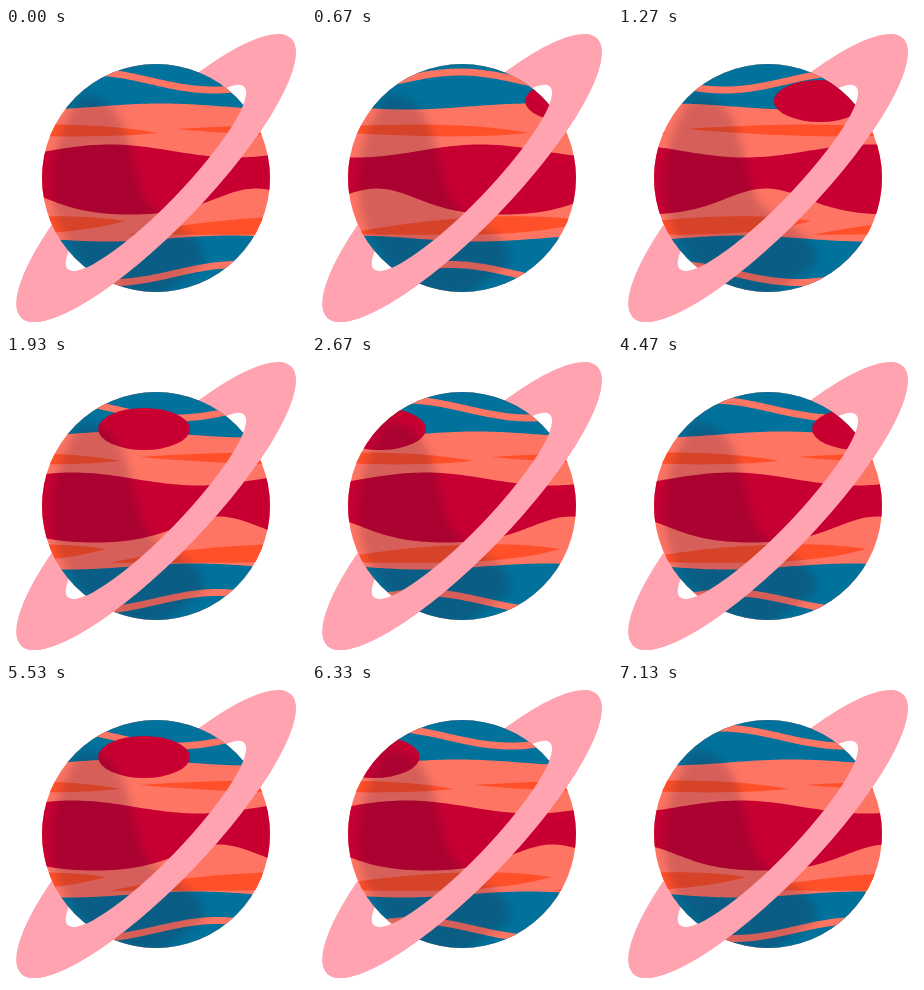
An HTML page with a canvas for the animation above (7190 ms loop, 300x300 px).

```html
<!DOCTYPE html>
<html lang="en">
<head>
<meta charset="utf-8">
<title>Ringed planet</title>
<style>
html, body { margin: 0; width: 100%; height: 100%; overflow: hidden; background: #fff; }
canvas { display: block; width: 300px; height: 300px; }
</style>
</head>
<body>
<canvas id="stage" width="300" height="300"></canvas>
<script>
const ctx = document.getElementById('stage').getContext('2d');
const LOOP = 7190, STEPS = 108, WRAP = 250;
const BLUE = '#00729c', CORAL = '#ff7564', RED = '#c80032', ORANGE = '#ff5029', PINK = '#ffa3b1';
const RING_ANGLE = -46 * Math.PI / 180;

// Wavy edge: `low` is the x of its lowest point on the screen, `broad` widens that part.
const wave = (mid, amp, low, broad = 0) => x => {
  const angle = (x - low) * 2 * Math.PI / WRAP;
  return mid + amp * Math.cos(angle - broad * Math.sin(angle));
};
const flat = y => () => y;

function band(color, top, bottom) {
  ctx.beginPath();
  for (let x = 30; x <= 270; x += 3) ctx.lineTo(x, top(x));
  for (let x = 270; x >= 30; x -= 3) ctx.lineTo(x, bottom(x));
  ctx.fillStyle = color;
  ctx.fill();
}

// Pointed stripes that are slim at the left and full at the right.
function lenses(start, length, y0, y1, mid, slim, full) {
  ctx.fillStyle = ORANGE;
  for (let x = start - 2 * WRAP; x < 270; x += WRAP) {
    const a = x + length * 0.3, b = x + length * 0.7, end = x + length;
    ctx.beginPath();
    ctx.moveTo(x, y0);
    ctx.bezierCurveTo(a, mid - slim, b, mid - full, end, y1);
    ctx.bezierCurveTo(b, mid + full, a, mid + slim, x, y0);
    ctx.fill();
  }
}

function shade() {
  ctx.save();
  ctx.filter = 'blur(4px)';
  ctx.fillStyle = 'rgba(50,15,45,.2)';
  ctx.beginPath();
  ctx.moveTo(76, 66);
  ctx.bezierCurveTo(132, 72, 119, 135, 140, 172);
  ctx.bezierCurveTo(156, 198, 200, 200, 198, 236);
  ctx.lineTo(150, 270);
  ctx.bezierCurveTo(50, 260, 15, 150, 76, 66);
  ctx.fill();
  ctx.restore();
}

function ring(frontOnly) {
  ctx.save();
  ctx.translate(150, 150);
  ctx.rotate(RING_ANGLE);
  if (frontOnly) {
    ctx.beginPath();
    ctx.rect(-200, 0, 400, 80);
    ctx.clip();
  }
  ctx.beginPath();
  ctx.ellipse(0, 0, 194.2, 51, 0, 0, 7);
  ctx.closePath();
  ctx.moveTo(127, 0);
  ctx.ellipse(0, 0, 127, 26.5, 0, 0, 7);
  ctx.fillStyle = PINK;
  ctx.fill('evenodd');
  ctx.restore();
}

function planet(step) {
  const fast = step % 13.5 / 13.5 * WRAP;
  const slow = step % 27 / 27 * WRAP;
  ctx.save();
  ctx.beginPath();
  ctx.arc(150, 150, 114, 0, 7);
  ctx.clip();
  ctx.fillStyle = CORAL;
  ctx.fillRect(30, 30, 240, 240);

  band(BLUE, flat(30), wave(78.5, 3, 30 - fast));
  band(CORAL, wave(49.5, 9, 208 - fast), wave(56.5, 9, 208 - fast));
  lenses(170 - fast, 232, 101, 105, 102, 5, 10);
  band(RED, wave(123, 6.5, 229 - fast), wave(173.5, 13, 125 - fast, 0.4));
  lenses(120 - slow, 249, 207, 193, 198, 6, 16);
  band(BLUE, wave(210.5, 3, 100 - fast), flat(270));
  band(CORAL, wave(242, 9, 106 - slow), wave(249, 9, 106 - slow));

  // The spot circles once for every two turns of the slow bands.
  ctx.beginPath();
  ctx.ellipse(240 - 6.37 * (step % 54 - 13), 73, 46, 21, 0, 0, 7);
  ctx.fillStyle = RED;
  ctx.fill();

  shade();
  ctx.restore();
}

function draw(now) {
  const step = Math.floor(now % LOOP / LOOP * STEPS);
  ctx.fillStyle = '#fff';
  ctx.fillRect(0, 0, 300, 300);
  ring(false);
  planet(step);
  ring(true);
}

const begin = performance.now();
function tick() {
  draw(performance.now() - begin);
  requestAnimationFrame(tick);
}
tick();
</script>
</body>
</html>
```
